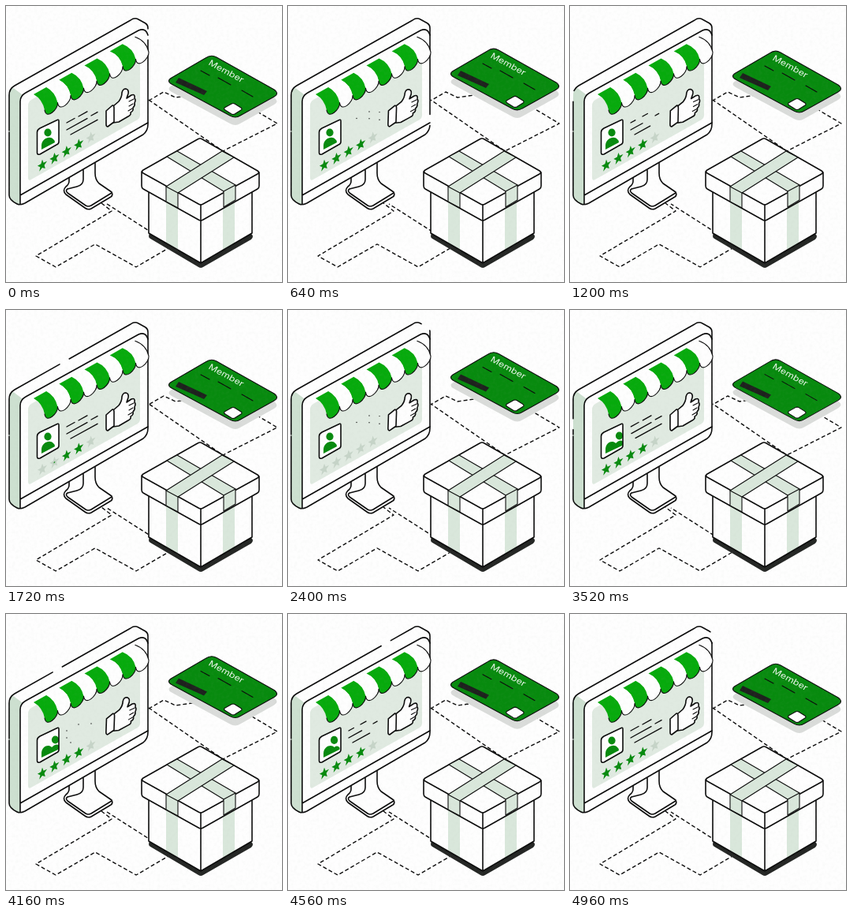
These frames come from a looping animation (350x350 px, 5 s). An HTML page:

```html
<!DOCTYPE html>
<html lang="en">
<head>
<meta charset="utf-8">
<title>Member shop</title>
<style>
html, body { margin: 0; width: 100%; height: 100%; overflow: hidden; background: #fefefe; }
svg { display: block; width: 100vw; height: 100vh; }
.ink { stroke: #0b0b0b; stroke-width: 1.6; stroke-linejoin: round; stroke-linecap: round; }
.line { fill: none; }
.white { fill: #fefefe; }
.pale { fill: #d9e7db; }
.green { fill: #078a0e; }
.dash { stroke-dasharray: 5 3; stroke-linecap: butt; stroke-width: 1.4; }
.fine { stroke-width: 1.1; }
text { font: 400 13px Inter, "Open Sans", sans-serif; fill: #eef8ee; }
</style>
</head>
<body>
<svg viewBox="0 0 350 350">
  <defs>
    <filter id="grain" x="0" y="0" width="100%" height="100%">
      <feTurbulence type="fractalNoise" baseFrequency=".25" numOctaves="2" seed="4"/>
      <feColorMatrix values="0 0 0 0 .4  0 0 0 0 .45  0 0 0 0 .4  .12 0 0 0 -.05"/>
    </filter>
    <path id="badge" d="M39.500 160Q39.500 157 43 155L64 145Q67 143 67 146V172Q67 175 64 176L43 188Q39.500 189 39.500 186Z"/>
    <clipPath id="frame"><use href="#badge"/></clipPath>
    <path id="star" d=""/>
    <path id="plate" d="M210 99Q203 95 210 91L253 66Q260 61 267 65L340 106Q347 111 340 115L297 139Q291 143 284 139Z"/>
  </defs>

  <g class="ink line dash" id="route">
    <path d="M181 120L200 109L215 116L250 111"/>
    <path d="M181 119L275 184L344 149L312 130"/>
    <path d="M121 250L134 260L38 317L63 331L113 302L165 331L218 300"/>
    <path d="M128 251L200 297"/>
  </g>

  <g class="ink" id="stand">
    <path class="white" d="M80 215V222Q80 226 76 229Q71 234 76 239L100 256Q104 259 108 257L133 242Q136 240 134 236L118 225Q113 220 113 212V195Z"/>
    <path class="line" d="M98 208V220Q98 227 90 229L78 232Q75 234 78 237L101 253Q104 255 108 253L134 237"/>
  </g>

  <g id="monitor">
    <path class="white" d="M4 160V113Q4 105 11 101L158 18Q163 14 168 17L177 22Q180 24 180 28V150Q180 158 174 163L24 250Q18 253 14 251Q4 246 4 240Z"/>
    <path fill="#cde0d0" d="M4 113Q4 107 8 103L20 112Q18 116 18 121V252Q4 248 4 240Z"/>
    <path class="ink line" d="M4 160V240Q4 246 14 251Q18 253 24 250L148 178"/>
    <path class="ink line" id="shell" d="M4 158V113Q4 105 11 101L158 18Q163 14 168 17L177 22Q180 24 180 28V150Q180 158 174 163L148 178"/>
    <path class="ink line" d="M18 251V121Q18 114 25 110L168 31Q177 27 180 37M18 240L180 148"/>
    <path fill="#e0eae1" d="M28 126Q28 122 32 119L166 44Q170 42 170 46V139Q170 142 167 144L32 220Q28 222 28 218Z"/>
    <g id="awning"></g>
    <g id="profile">
      <use href="#badge" class="white"/>
      <g clip-path="url(#frame)" class="green">
        <ellipse id="head" rx="4.6" ry="5.1"/>
        <path id="torso"/>
      </g>
      <use href="#badge" class="ink line"/>
    </g>
    <g class="ink" id="copy"></g>
    <g id="stars"></g>
    <g class="ink white" id="thumb">
      <path d="M136 127L143 121C146 117 147 113 147 110Q148 105 152 105Q156 106 155 111L153 117L159 113Q164 111 163 117Q165 119 163 123Q164 126 161 129Q162 133 158 135Q159 138 155 140L143 147L136 148Z"/>
      <path d="M127 133L135 126Q137 126 137 129V147L129 153Q127 153 127 150Z"/>
      <path class="line fine" d="M156 121L162 118M156 127L161 124M155 133L160 130"/>
    </g>
  </g>

  <g id="card">
    <use href="#plate" y="10" fill="#dadcda"/>
    <use href="#plate" class="green ink fine"/>
    <path fill="#1d211d" d="M219 91L255 108L251 113L215 97Z"/>
    <path class="white ink fine" d="M277 129L286 124Q288 123 290 124L298 129Q300 131 298 132L290 137Q288 138 286 137L278 132Q276 131 277 129Z"/>
    <path class="ink line fine" d="M247 82L258 88M269 91L285 100M299 107L313 115"/>
    <text transform="matrix(.84 .46 -.42 .68 256 74)">Member</text>
  </g>

  <g id="gift">
    <path fill="#242624" d="M182 286L181 292Q181 294 183 295L244 331Q247 333 250 331L311 296Q315 292 311 289L300 286Z"/>
    <path class="white" d="M181 226V288L247 326L312 288V226Z"/>
    <path class="pale" d="M203 236V301L218 309V246ZM275 246V309L290 301V236Z"/>
    <g class="ink">
      <path class="line" d="M181 236V288L247 326L312 288V236M247 270V326"/>
      <path class="white" d="M172 210V228Q172 231 174 232L244 271Q247 273 250 271L319 232Q321 231 321 228V211Z"/>
      <path class="white" d="M174 212Q171 210 174 208L243 169Q246 167 249 169L319 209Q322 211 319 213L250 251Q247 253 244 251Z"/>
    </g>
    <g class="pale ink fine">
      <path d="M204 191L217 184L291 227V246L276 255V235Z"/>
      <path d="M203 229L274 184L289 192L218 237V256L203 248Z"/>
      <path class="line" d="M203 229L218 237M276 235L291 227"/>
    </g>
    <path class="ink line" d="M247 252V272"/>
  </g>
  <rect width="350" height="350" filter="url(#grain)" pointer-events="none"/>
</svg>
<script>
const LOOP = 5000, BEAT = LOOP / 3;
const $ = id => document.getElementById(id);
const clamp = x => Math.max(0, Math.min(1, x));
const smooth = x => (x = clamp(x), x * x * (3 - 2 * x));
const ramp = (t, start, length) => smooth((t - start) / length);

function add(parent, tag, attrs) {
  const el = document.createElementNS('http://www.w3.org/2000/svg', tag);
  for (const key in attrs) el.setAttribute(key, attrs[key]);
  return parent.appendChild(el);
}

// Awning strips, each ending in a round scallop
for (let i = 7; i >= 0; i--) {
  const top = n => [35 + 16.1 * n, 112 - 9.1 * n];
  const low = n => [49 + 16.5 * n, 132 - 9.2 * n];
  const [ax, ay] = top(i), [bx, by] = top(i + 1);
  const [cx, cy] = low(i + 1), [dx, dy] = low(i);
  const side = `M${bx} ${by}Q${cx - 3} ${cy - 14} ${cx} ${cy}`;
  const scallop = `C${cx + 1} ${cy + 8} ${dx + 2} ${dy + 13} ${dx} ${dy}`;
  add($('awning'), 'path', {
    fill: i % 2 ? '#fefefe' : '#06aa0c',
    d: `${side}${scallop}Q${dx - 3} ${dy - 14} ${ax} ${ay}Z`
  });
  add($('awning'), 'path', {
    class: 'ink line fine',
    d: i === 7 ? side + scallop : `M${cx} ${cy}${scallop}`
  });
}

// Stars on the slanted screen plane
const starPoints = Array.from({ length: 10 }, (_, k) => {
  const r = k % 2 ? 3.1 : 7.2, a = k * Math.PI / 5;
  return 'ML'[+(k > 0)] + r * Math.sin(a) + ' ' + -r * Math.cos(a);
}).join('') + 'Z';
$('star').setAttribute('d', starPoints);
const stars = [];
for (let i = 0; i < 5; i++) {
  const spot = add($('stars'), 'g', {
    transform: `matrix(.88 -.45 0 1 ${46 + 15.4 * i} ${202 - 8.8 * i})`
  });
  add(spot, 'use', { href: '#star', fill: '#c6d4c8' });
  if (i < 4) stars.push(add(spot, 'use', { href: '#star', class: 'green' }));
}

// Text strokes: left x, left y, width
const strokes = [[77, 148, 10], [92, 140, 11], [77, 157, 26], [108, 139, 8], [82, 163, 34]]
  .map(([x, y, width]) => ({ x, y, width, el: add($('copy'), 'path', { style: 'stroke-width:1.4' }) }));

function draw(t) {
  const beat = t % BEAT / BEAT;
  const lift = smooth((1 - Math.cos(2 * Math.PI * beat)) / 2);
  $('card').setAttribute('transform', `translate(0 ${-9.5 * lift})`);
  $('thumb').setAttribute('transform', `rotate(${2 * lift} 130 146)`);

  // Wiped out to the right, then written again from the left
  const wiped = beat < .47;
  const from = wiped ? ramp(beat, .08, .3) : 0;
  const to = wiped ? 1 : ramp(beat, .5, .4);
  for (const { x, y, width, el } of strokes) {
    const point = k => `${x + width * k} ${y - width * k * .55}`;
    el.setAttribute('d', `M${point(from)}L${point(to)}`);
  }

  stars.forEach((el, i) => {
    const size = 1 - ramp(t, 1360 + 160 * i, 280) + ramp(t, 2600 + 160 * i, 280);
    el.setAttribute('transform', `scale(${size})`);
  });

  const lean = ramp(t, 2900, 500) - ramp(t, 4340, 500);
  const mix = (a, b) => a + (b - a) * lean;
  $('head').setAttribute('cx', mix(53, 62.5));
  $('head').setAttribute('cy', mix(160.5, 159.5));
  $('torso').setAttribute('d',
    `M45 182V${mix(177, 176)}C${mix(45, 46)} ${mix(168, 167)} ${mix(56, 54)} ${mix(164, 165)} ` +
    `${mix(60, 58)} ${mix(169, 169)}Q${mix(62, 63)} ${mix(170, 163)} ${mix(62, 68)} ${mix(173, 167)}V${mix(173, 171)}Z`);

  $('route').style.strokeDashoffset = -96 * t / LOOP;
  $('shell').style.strokeDasharray = '410 14';
  $('shell').style.strokeDashoffset = 153 - 848 * t / LOOP;
}

const start = performance.now();
function tick() {
  draw((performance.now() - start) % LOOP);
  requestAnimationFrame(tick);
}
tick();
</script>
</body>
</html>
```
